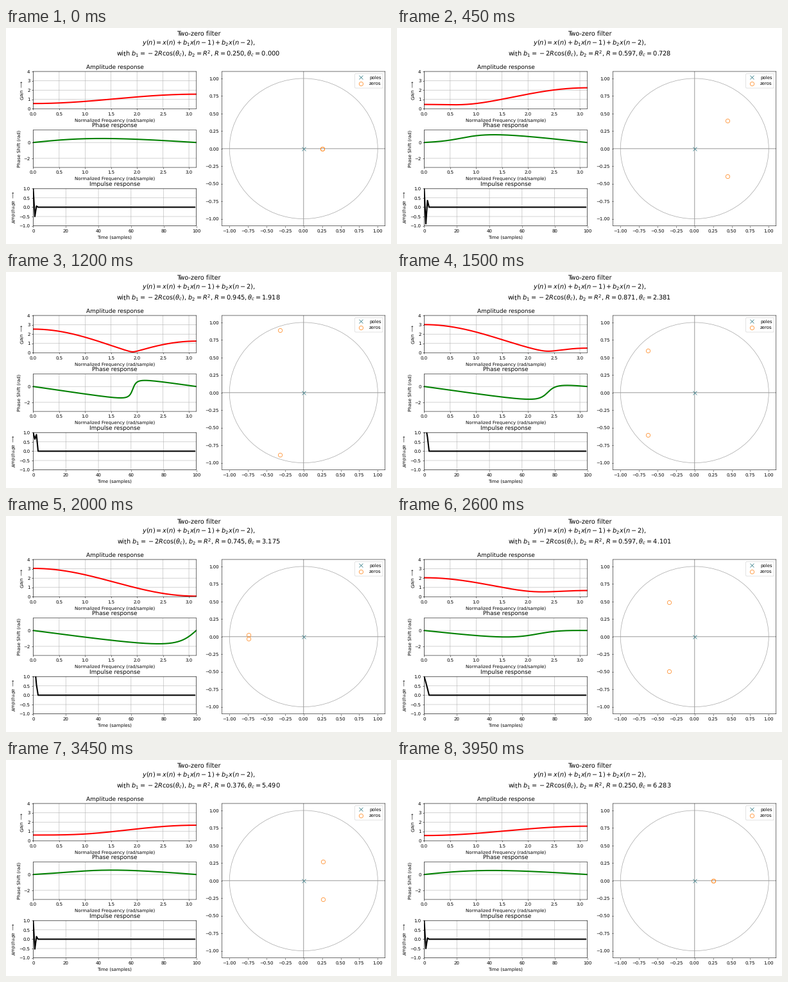
Recreate the animation shown at these times as a matplotlib script. Size 600 px wide and 338 px high, loop 4000 ms.

```python
import numpy as np
import matplotlib.pyplot as plt
from matplotlib.animation import FuncAnimation
from matplotlib.patches import Circle

W, H, DPI = 600, 338, 50
FRAMES, INTERVAL = 80, 50
STEPS = 96  # parameter steps per sweep, resampled to FRAMES

plt.rcParams.update({
    "font.family": "DejaVu Sans",
    "font.size": 10,
    "axes.titlesize": 13,
    "text.hinting": "none",
    "path.snap": False,
    "toolbar": "None",
})

fig = plt.figure(figsize=(W / DPI, H / DPI), dpi=DPI, facecolor="white")


def add_axes(x0, y0, x1, y1):
    """Axes from pixel edges, y measured from the top."""
    return fig.add_axes([x0 / W, 1 - y1 / H, (x1 - x0) / W, (y1 - y0) / H])


def response_axes(top, title, xlabel, ylabel, xlim, ylim, xticks, yticks):
    ax = add_axes(42.4, top, 296.5, top + 58.4)
    ax.set(title=title, xlabel=xlabel, ylabel=ylabel, xlim=xlim, ylim=ylim,
           xticks=xticks, yticks=yticks)
    ax.grid(True)
    return ax


def heading(y, text=""):
    return fig.text(0.5, 1 - y / H, text, size=14, ha="center", va="baseline")


# Filter parameters
def params(frame):
    t = round(frame * STEPS / FRAMES) / (STEPS - 1)
    radius = 0.25 + min(3 * t, 1 - t)
    return radius, 2 * np.pi * t


omega = np.linspace(0, np.pi, 512)
delay = np.exp(-1j * omega)
samples = np.arange(100)

# Left column: responses
freq = "Normalized Frequency (rad/sample)"
freq_ticks = np.arange(0, 3.1, 0.5)
ax_amp = response_axes(68, "Amplitude response", freq,
                       r"Gain $\longrightarrow$",
                       (0, np.pi), (0, 4), freq_ticks, range(5))
ax_phase = response_axes(159.7, "Phase response", freq, "Phase Shift (rad)",
                         (0, np.pi), (-np.pi, np.pi / 2), freq_ticks, [-2, 0])
ax_imp = response_axes(251.2, "Impulse response", "Time (samples)",
                       r"Amplitude $\longrightarrow$",
                       (0, 100), (-1, 1), range(0, 101, 20),
                       np.arange(-1, 1.1, 0.5))

amp_line, = ax_amp.plot([], [], "r", lw=3)
phase_line, = ax_phase.plot([], [], "g", lw=3)
imp_line, = ax_imp.plot([], [], "k", lw=3)

# Right column: pole-zero plot
ax_pz = add_axes(336.7, 68, 590.8, 309.6)
ticks = np.arange(-1, 1.1, 0.25)
ax_pz.set(xlim=(-1.1, 1.1), ylim=(-1.1, 1.1), xticks=ticks, yticks=ticks)
ax_pz.add_patch(Circle((0, 0), 1, fill=False, color="0.65", lw=1))
ax_pz.axvline(0, color="0.62")
ax_pz.axhline(0, color="0.62")
ax_pz.plot([0], [0], "x", ms=9, color="#2d7883", label="poles")
zeros, = ax_pz.plot([], [], "o", ms=9, mfc="none", mec="C1", label="zeros")
ax_pz.legend(loc="upper right")

# Headings
heading(12.2, "Two-zero filter")
heading(25.8, r"$y(n) = x(n) + b_1 x(n-1) + b_2 x(n-2),$")
status = heading(42.8)


def update(frame):
    radius, theta = params(frame)
    b1, b2 = -2 * radius * np.cos(theta), radius ** 2
    h = 1 + b1 * delay + b2 * delay ** 2
    impulse = np.zeros(samples.size)
    impulse[:3] = 1, b1, b2
    zero = radius * np.exp(1j * theta)

    amp_line.set_data(omega, np.abs(h))
    phase_line.set_data(omega, np.angle(h))
    imp_line.set_data(samples, impulse)
    zeros.set_data([zero.real] * 2, [zero.imag, -zero.imag])
    status.set_text(
        r"with $b_1 = -2R\cos(\theta_c)$, $b_2 = R^2$, "
        rf"$R = {radius:.3f}, \theta_c = {theta:.3f}$")
    return amp_line, phase_line, imp_line, zeros, status


anim = FuncAnimation(fig, update, frames=FRAMES, interval=INTERVAL,
                     repeat=True, repeat_delay=0, blit=False)
plt.show()
```
